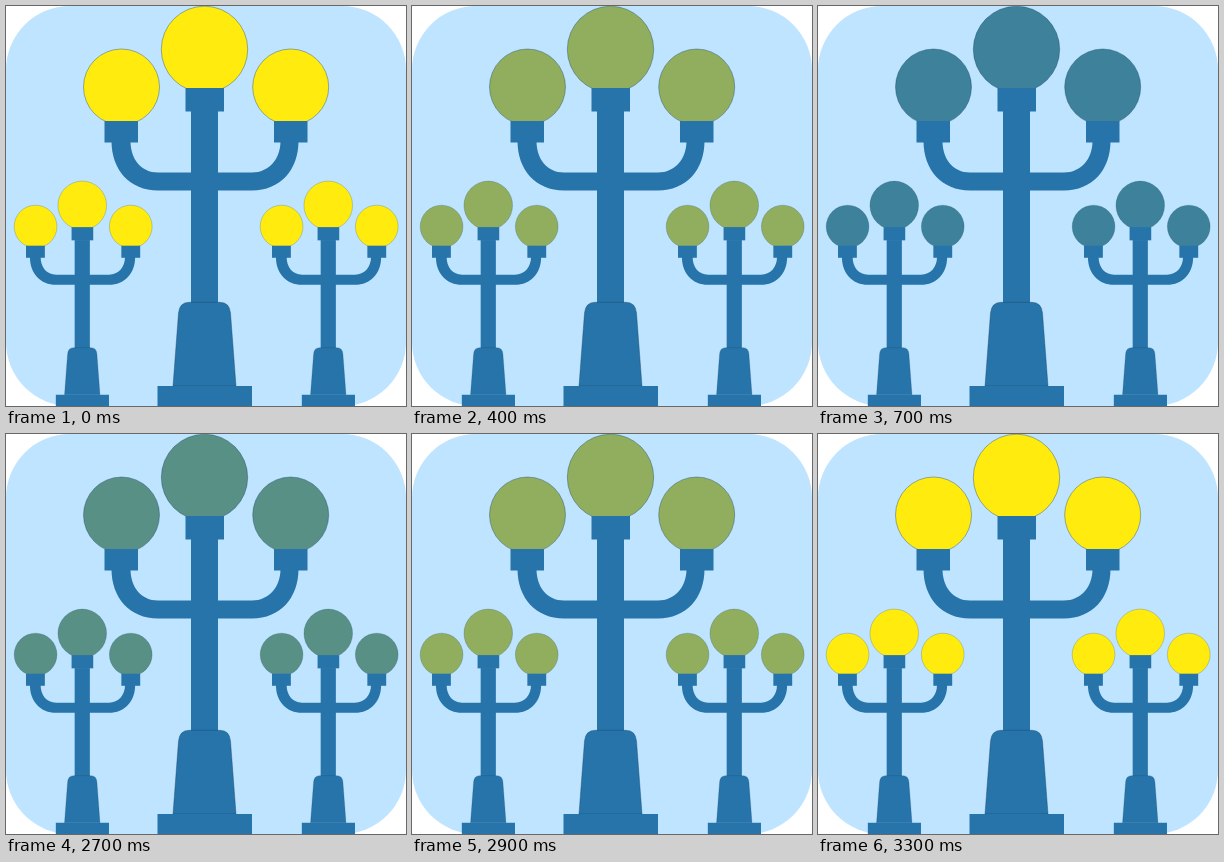
These frames come from a looping animation (400x400 px, 6.3 s). An HTML page with a canvas:

```html
<!DOCTYPE html>
<html lang="en">
<head>
<meta charset="utf-8">
<title>Street lamps</title>
<style>
  html, body { margin: 0; width: 100%; height: 100%; overflow: hidden; background: #fff; }
  canvas { display: block; width: 100vw; height: 100vh; }
</style>
</head>
<body>
<canvas></canvas>
<script>
const LOOP = 6300, STEP = 100, STEPS = 7;
const SKY = '#bfe4ff', POST = '#2674aa', EDGE = 'rgba(25, 65, 95, 0.65)';
const LIT = [255, 235, 14], DIM = [61, 129, 154];

const canvas = document.querySelector('canvas');
const ctx = canvas.getContext('2d');
const globes = [[198.5, 43.4, 43.2], [115.5, 81, 38], [284.7, 81, 38]];

const clampStep = t => Math.max(0, Math.min(STEPS, Math.floor(t / STEP) + 1));

// Stepped fade: 0 is lit, 1 is dim
function dimness(t) {
  return (clampStep(t - 100) - clampStep(t - 2700)) / STEPS;
}

function mix(k) {
  return `rgb(${LIT.map((c, i) => Math.round(c + (DIM[i] - c) * k))})`;
}

function drawArms() {
  ctx.beginPath();
  ctx.moveTo(105.5, 135);
  ctx.bezierCurveTo(105.5, 164, 124, 184.5, 152, 184.5);
  ctx.lineTo(246, 184.5);
  ctx.bezierCurveTo(274, 184.5, 292.5, 164, 292.5, 135);
  ctx.lineTo(274.5, 135);
  ctx.bezierCurveTo(274.5, 153, 263, 166.5, 246, 166.5);
  ctx.lineTo(152, 166.5);
  ctx.bezierCurveTo(135, 166.5, 124.5, 153, 124.5, 135);
  ctx.fill();
}

function drawBase() {
  ctx.beginPath();
  ctx.moveTo(167, 380);
  ctx.lineTo(172.5, 307);
  ctx.quadraticCurveTo(173.5, 296.3, 183, 296.3);
  ctx.lineTo(214, 296.3);
  ctx.quadraticCurveTo(223.5, 296.3, 224.5, 307);
  ctx.lineTo(230, 380);
  ctx.closePath();
  ctx.fill();
  ctx.stroke();
}

function drawLamp(x, y, scale, glow) {
  ctx.save();
  ctx.translate(x, y);
  ctx.scale(scale, scale);
  ctx.strokeStyle = EDGE;
  ctx.lineWidth = 0.6;

  ctx.fillStyle = glow;
  for (const [cx, cy, r] of globes) {
    ctx.beginPath();
    ctx.arc(cx, cy, r, 0, Math.PI * 2);
    ctx.fill();
    ctx.stroke();
  }

  ctx.fillStyle = POST;
  ctx.fillRect(179.5, 82, 38.5, 23.5);
  ctx.fillRect(98.5, 115, 33.5, 21.5);
  ctx.fillRect(268, 115, 33.5, 21.5);
  ctx.fillRect(185, 105, 27, 192);
  drawArms();
  drawBase();
  ctx.fillRect(151.5, 380, 94.5, 20);
  ctx.restore();
}

function render(t) {
  const ratio = devicePixelRatio || 1;
  const w = Math.round(innerWidth * ratio), h = Math.round(innerHeight * ratio);
  if (canvas.width !== w || canvas.height !== h) {
    canvas.width = w;
    canvas.height = h;
  }
  ctx.setTransform(w / 400, 0, 0, h / 400, 0, 0);
  ctx.fillStyle = '#fff';
  ctx.fillRect(0, 0, 400, 400);
  ctx.fillStyle = SKY;
  ctx.beginPath();
  ctx.roundRect(0, 0, 400, 400, 64);
  ctx.fill();

  const glow = mix(dimness(t));
  drawLamp(0, 0, 1, glow);
  drawLamp(-35.4, 175, 0.5625, glow);
  drawLamp(210.6, 175, 0.5625, glow);
}

const start = performance.now();
function tick() {
  render((performance.now() - start) % LOOP);
  requestAnimationFrame(tick);
}
tick();
</script>
</body>
</html>
```
